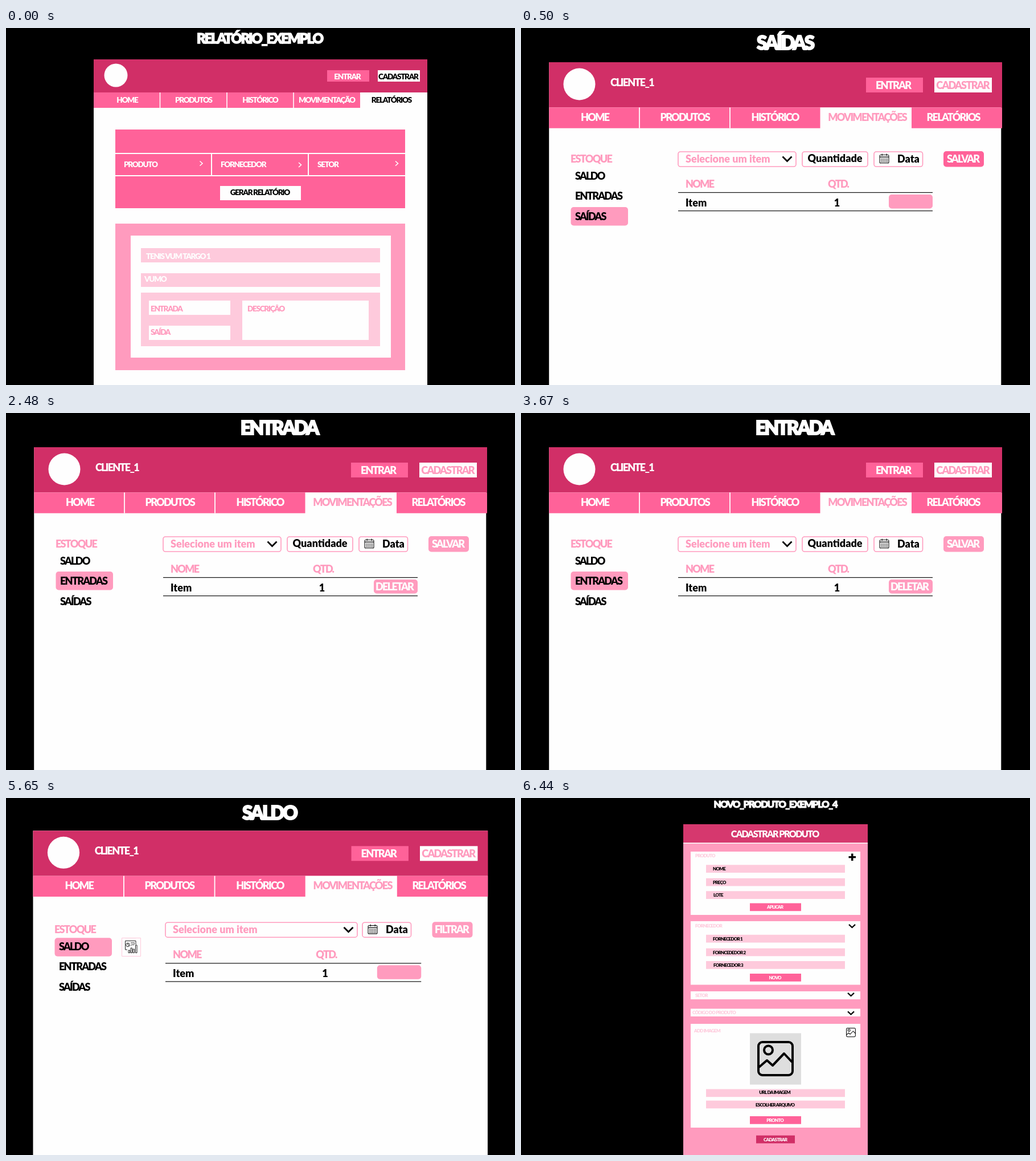
Write an HTML page with a canvas that moves like this. It is 894x626 px and loops after 8 s.

```html
<!DOCTYPE html>
<html lang="pt">
<head>
<meta charset="utf-8">
<style>
  html, body { margin: 0; width: 100%; height: 100%; overflow: hidden; background: #000; }
  canvas { display: block; }
</style>
</head>
<body>
<canvas id="stage" width="894" height="626"></canvas>
<script>
const ctx = document.getElementById('stage').getContext('2d');
const WHITE = '#fefefe', BLACK = '#000', WINE = '#d12f67', HOT = '#ff6299', PINK = '#ff9bbe', PALE = '#fecadc';
const LOOP = 8000;
const CAPS_TRACKING = -0.095;

// Rectangles are given by their edges.
function box(x0, y0, x1, y1, color) {
  ctx.fillStyle = color;
  ctx.fillRect(x0, y0, x1 - x0, y1 - y0);
}

function round(x0, y0, x1, y1, r, color, line) {
  ctx.beginPath();
  ctx.roundRect(x0, y0, x1 - x0, y1 - y0, r);
  if (line) {
    ctx.strokeStyle = color;
    ctx.lineWidth = line;
    ctx.stroke();
  } else {
    ctx.fillStyle = color;
    ctx.fill();
  }
}

function disc(x, y, r, color) {
  ctx.beginPath();
  ctx.arc(x, y, r, 0, Math.PI * 2);
  ctx.fillStyle = color;
  ctx.fill();
}

function path(points, color, width) {
  ctx.beginPath();
  points.forEach(([x, y]) => ctx.lineTo(x, y));
  ctx.strokeStyle = color;
  ctx.lineWidth = width;
  ctx.stroke();
}

// Capitals are set tight; returns the tracking in pixels.
function setType(str, size, align) {
  const tracking = str === str.toUpperCase() ? size * CAPS_TRACKING : 0;
  ctx.font = `900 ${size}px Lato, sans-serif`;
  ctx.letterSpacing = tracking + 'px';
  ctx.textAlign = align;
  return tracking;
}

function text(str, x, y, size, color) {
  setType(str, size, 'left');
  ctx.fillStyle = color;
  ctx.fillText(str, x, y);
}

function label(str, x, y, size, color, outline = 0) {
  const cx = x + setType(str, size, 'center') / 2;
  ctx.fillStyle = ctx.strokeStyle = color;
  ctx.fillText(str, cx, y);
  if (outline) {
    ctx.lineWidth = outline;
    ctx.strokeText(str, cx, y);
  }
}

const title = (str, x, y, size) => label(str, x, y, size, '#fff', size / 18);

const down = (x, y, w, h, line) => path([[x - w, y - h], [x, y + h], [x + w, y - h]], BLACK, line);

function report() {
  title('RELATÓRIO_EXEMPLO', 446.5, 27, 24);
  box(154, 55, 740, 626, WHITE);
  box(154, 55, 740, 113, WINE);
  disc(193, 83, 20.5, WHITE);
  box(564, 74, 638, 94, HOT);
  label('ENTRAR', 600, 90, 13.5, WHITE);
  box(653, 74, 727, 94, WHITE);
  label('CADASTRAR', 689.5, 90, 13.5, BLACK);

  box(154, 113, 622, 140, HOT);
  for (const x of [270.5, 388, 505]) box(x - .8, 113, x + .8, 140, WHITE);
  [['HOME', 213.5], ['PRODUTOS', 330], ['HISTÓRICO', 447], ['MOVIMENTAÇÃO', 564], ['RELATÓRIOS', 677.5]]
    .forEach(([s, x], i) => label(s, x, 131, 13.5, i < 4 ? WHITE : BLACK));

  box(192, 178, 701, 219, HOT);
  box(192, 260, 701, 316, HOT);
  [['PRODUTO', 192, 360, 343, 237.5], ['FORNECEDOR', 362, 530, 516.5, 240], ['SETOR', 532, 701, 686.5, 237.5]]
    .forEach(([s, x0, x1, cx, cy]) => {
      box(x0, 221, x1, 258, HOT);
      text(s, x0 + 15, 244, 13.5, WHITE);
      path([[cx - 2.5, cy - 4], [cx + 2, cy], [cx - 2.5, cy + 4]], WHITE, 1.6);
    });
  box(376, 277, 518, 302, WHITE);
  label('GERAR RELATÓRIO', 446.5, 293, 13.5, BLACK);

  box(192, 343, 701, 600, PINK);
  box(219, 364, 676, 578, WHITE);
  box(237, 386, 657, 411, PALE);
  text('TENIS VUM TARGO 1', 246, 405, 13.5, WHITE);
  box(237, 430, 657, 454, PALE);
  text('VUMO', 243, 445, 13.5, WHITE);
  box(237, 464, 657, 558, PALE);
  box(251, 478, 394, 503, WHITE);
  text('ENTRADA', 254, 497, 13.5, PINK);
  box(251, 522, 394, 547, WHITE);
  text('SAÍDA', 254, 538, 13.5, PINK);
  box(415, 478, 637, 547, WHITE);
  text('DESCRIÇÂO', 424, 497, 13.5, PINK);
}

function stockHeader(right) {
  box(49.2, 60, right, 640, WHITE);
  box(49.2, 60, 845, 139.3, WINE);
  disc(102.5, 98.5, 28, WHITE);
  text('CLIENTE_1', 157, 102, 18, WHITE);
  box(606, 87, 706, 113, HOT);
  label('ENTRAR', 654.5, 107, 18, WHITE);
  box(726, 87, 827, 113, WHITE);
  label('CADASTRAR', 776.5, 107, 18, PINK);

  box(49.2, 139.3, 845, 175.7, HOT);
  for (const x of [208, 367]) box(x - .9, 139.3, x + .9, 175.7, WHITE);
  box(525.5, 139.3, 686, 176, WHITE);
  [['HOME', 130.5], ['PRODUTOS', 288.5], ['HISTÓRICO', 447], ['MOVIMENTAÇÕES', 609], ['RELATÓRIOS', 760]]
    .forEach(([s, x], i) => label(s, x, 163, 18, i === 3 ? PINK : WHITE));
}

function stockMenu(active) {
  const top = [244, 278, 314][active];
  text('ESTOQUE', 87, 236, 18, PINK);
  round(87.5, top, 188, top + 32.5, 5, PINK);
  text('SALDO', 95, 266, 18, BLACK);
  text('ENTRADAS', 95, 301, 18, BLACK);
  text('SAÍDAS', 95, 337, 18, BLACK);
}

function select(x0, x1) {
  round(x0, 217, x1, 243, 4, PINK, 1.6);
  text('Selecione um item', x0 + 13, 236, 18, PINK);
  down(x1 - 15.5, 229.5, 8, 4, 2.8);
}

function dateField(x) {
  round(x, 217, x + 85.5, 243, 4, PINK, 1.6);
  round(x + 10, 222.5, x + 26, 237, 2, '#222', 1.2);
  box(x + 10, 225.5, x + 26, 227, '#222');
  for (const dx of [13.5, 21.5]) box(x + dx, 220.5, x + dx + 1.4, 224, '#222');
  for (let i = 0; i < 15; i++) {
    const px = x + 12.2 + i % 5 * 2.6, py = 228.8 + Math.floor(i / 5) * 2.6;
    box(px, py, px + 1.5, py + 1.5, '#222');
  }
  text('Data', x + 41, 236, 18, BLACK);
}

function action(str, x, color) {
  round(x, 216, x + 71, 243.5, 5, color);
  label(str, x + 35, 236, 18, WHITE);
}

function table(button) {
  text('NOME', 289, 280, 18, PINK);
  text('QTD.', 539, 280, 18, PINK);
  text('Item', 289, 313, 18, BLACK);
  label('1', 555, 313, 18, BLACK);
  box(276, 287.9, 723, 289.1, '#111');
  box(276, 320, 723, 321.2, '#111');
  round(646, 292, 723, 316.5, 5, PINK);
  label(button, 683, 311, 18, WHITE);
}

function movement(name, x, active, color, button) {
  title(name, x, 38, 33);
  stockHeader(843.3);
  stockMenu(active);
  select(276, 483);
  round(494, 217, 609, 243, 4, PINK, 1.6);
  label('Quantidade', 551.5, 235, 18, BLACK);
  dateField(620);
  action('SALVAR', 742, color);
  table(button);
}

function chartIcon() {
  round(203.5, 245.5, 236.5, 277.5, 0, PALE, 1);
  path([[213, 266], [209.5, 266], [209.5, 250.5], [228, 250.5], [228, 257]], '#222', 1);
  ctx.beginPath();
  ctx.arc(214, 257.5, 3.2, 0, Math.PI * 2);
  ctx.moveTo(214, 254.3);
  ctx.lineTo(214, 257.5);
  ctx.lineTo(217, 259);
  ctx.stroke();
  path([[219, 254], [226, 254]], '#222', 1);
  path([[219, 259], [221.5, 256.5], [223, 258], [226, 255.5]], '#222', 1);
  [[215, 267], [219, 263], [223, 265], [227.5, 258]].forEach(([x, y]) => round(x, y, x + 2.5, 271.5, 0, '#222', 1));
}

function shifted(x, y, scale, draw) {
  ctx.save();
  ctx.translate(x, y);
  ctx.scale(scale, 1);
  draw();
  ctx.restore();
}

function balance() {
  title('SALDO', 464, 38, 33);
  shifted(-1.9, -2.7, 1.004, () => stockHeader(844.5));
  shifted(-2, 1.3, 1, () => stockMenu(0));
  chartIcon();
  shifted(0, 1.2, 1, () => {
    select(280, 617);
    dateField(626);
    action('FILTRAR', 748.5, PINK);
  });
  shifted(2.6, 1.3, 1.005, () => table(''));
}

function picture(x, y, s) {
  ctx.save();
  ctx.translate(x, y);
  ctx.scale(s, s);
  round(0, 0, 60, 58, 7, BLACK, 4);
  ctx.beginPath();
  ctx.arc(17.5, 14, 7.5, 0, Math.PI * 2);
  ctx.stroke();
  ctx.lineJoin = 'round';
  path([[1, 44], [15, 32], [25, 41], [45, 20], [59, 35]], BLACK, 4);
  ctx.restore();
}

function product() {
  const field = y => box(325, y, 569, y + 13.7, PALE);
  const button = (s, y) => {
    box(402, y, 492, y + 13.7, HOT);
    label(s, 446.5, y + 9.8, 8, WHITE);
  };
  title('NOVO_PRODUTO_EXEMPLO_4', 447.5, 17, 17);
  box(285, 46, 609, 626, PINK);
  box(285, 46, 609, 78.5, '#d6386e');
  box(285, 78.5, 609, 80, WHITE);
  label('CADASTRAR PRODUTO', 446.5, 69, 16, WHITE);

  [[94, 205], [216, 327.5], [339, 353], [369.5, 383], [396, 578]].forEach(([a, b]) => box(298, a, 596, b, WHITE));
  [['PRODUTO', 306, 103.5], ['FORNECEDOR', 306, 226.5], ['SETOR', 306, 349], ['CÓDIGO DO PRODUTO', 301, 379], ['ADD IMAGEM', 304, 411]]
    .forEach(([s, x, y]) => text(s, x, y, 8, PALE));
  [117.3, 140.7, 163.3, 239.8, 263.6, 286, 510.5, 530.6].forEach(field);
  [['NOME', 337, 127], ['PREÇO', 337, 151], ['LOTE', 338, 173], ['FORNECEDOR 1', 337, 249.5], ['FORNCEDEDOR 2', 337, 273.5], ['FORNECEDOR 3', 338, 295.5]]
    .forEach(([s, x, y]) => text(s, x, y, 8, BLACK));
  button('APLICAR', 184.5);
  button('NOVO', 308);
  button('PRONTO', 558);

  box(575.5, 102, 588, 105.3, BLACK);
  box(580, 97.5, 583.5, 110, BLACK);
  down(581.5, 224.5, 5.5, 2.6, 2.2);
  down(579.5, 344.5, 5.5, 2.6, 2.2);
  down(579.5, 377, 5.5, 2.6, 2.2);

  picture(571.6, 403.5, .262);
  box(402, 412.5, 492, 502.5, '#dedede');
  picture(417, 428, 1);
  label('URL DA IMAGEM', 446, 519, 8, BLACK);
  label('ESCOLHER ARQUIVO', 446.5, 540.5, 8, BLACK);
  box(413, 591.7, 481, 605.5, WINE);
  label('CADASTRAR', 447, 602, 8, WHITE);
}

const scenes = [
  [0, report],
  [500, () => movement('SAÍDAS', 465, 2, HOT, '')],
  [2480, () => movement('ENTRADA', 481, 1, PINK, 'DELETAR')],
  [4460, balance],
  [6440, product]
];

const start = performance.now();
function render(now) {
  const t = Math.max(0, now - start) % LOOP;
  box(0, 0, 894, 626, BLACK);
  scenes.findLast(([from]) => t >= from)[1]();
  requestAnimationFrame(render);
}
render(start);
</script>
</body>
</html>
```
